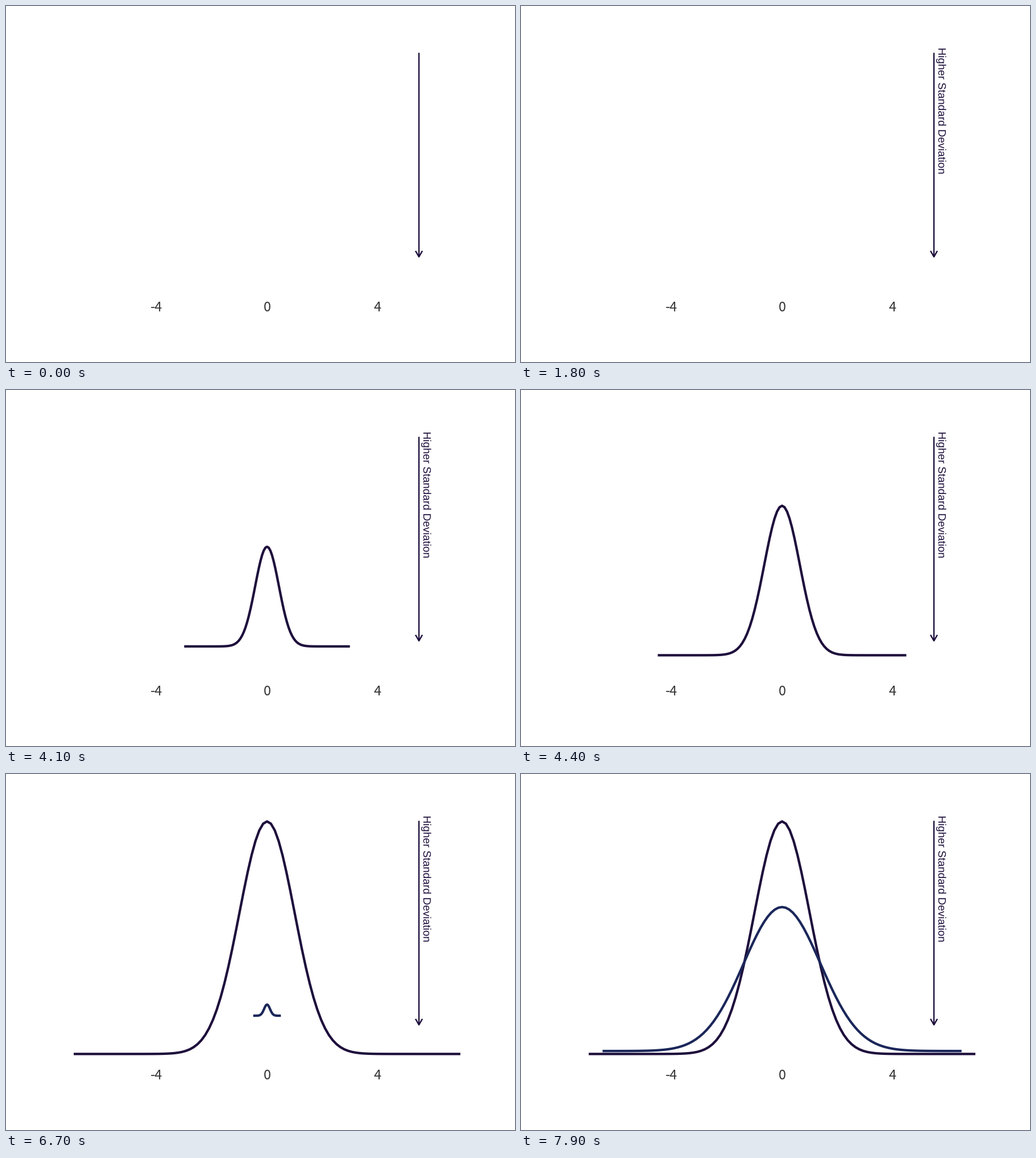
A matplotlib script that plays this animation: 895 by 626 pixels, repeating every 8000 ms.

```python
import numpy as np
import matplotlib.pyplot as plt
from matplotlib.animation import FuncAnimation
from matplotlib.patches import PathPatch
from matplotlib.path import Path
from matplotlib.textpath import TextPath

W, H, DPI = 895, 626, 100
PT = 72 / DPI                  # points per pixel
STEPS = 14                     # frames an element takes to grow in
PURPLE, BLUE, GREY = "#1e0f3c", "#1b275a", "#333333"


def px(x):
    return 459 + 48.56 * x


def py(y):
    return 492.3 - 1025 * y


# The small surplus keeps the size from rounding down a pixel
fig = plt.figure(figsize=((W + 0.01) / DPI, (H + 0.01) / DPI), dpi=DPI,
                 facecolor="white")
ax = fig.add_axes([0, 0, 1, 1])
ax.set_xlim(0, W)
ax.set_ylim(H, 0)
ax.axis("off")


def stroke(x, y, color, width):
    line, = ax.plot(x, y, color=color, lw=width * PT, snap=False,
                    solid_capstyle="butt", solid_joinstyle="round")
    return line


# Axis labels
for value in (-4, 0, 4):
    ax.text(px(value), 536.5, f"{value:d}", family="Noto Sans CJK JP",
            color=GREY, fontsize=23.5 * PT, ha="center", va="baseline")

# Arrow
shaft, tip = px(5.5), py(0.05)
stroke([shaft, shaft], [py(0.4), tip], PURPLE, 2.4)
stroke([shaft - 6, shaft, shaft + 6], [tip - 10.4, tip, tip - 10.4], PURPLE, 2.4)

# Caption, reading downwards, centred on its cap height
SIZE = 18.97
glyphs = TextPath((0, 0), "Higher Standard Deviation", size=SIZE,
                  prop={"family": "Liberation Sans"})
box = glyphs.get_extents()
u = glyphs.vertices[:, 0] - (box.x0 + box.x1) / 2
v = glyphs.vertices[:, 1] - 0.344 * SIZE
caption = ax.add_patch(PathPatch(glyphs, facecolor=PURPLE, lw=0))

# Bell curves: (line, sd, first frame)
xs = np.linspace(-7, 7, 101)
curves = [(stroke([], [], PURPLE, 4.27), 1.0, 36),
          (stroke([], [], BLUE, 4.27), 1.5, 67)]


def growth(frame, start):
    return min(max(frame - start + 1, 0), STEPS) / STEPS


def draw(frame):
    s = growth(frame, 5)
    caption.set_visible(s > 0)
    verts = np.column_stack([740.4 + v * s, py(0.3) + u * s])
    caption.set_path(Path(verts, glyphs.codes))

    for line, sd, start in curves:
        s = growth(frame, start)
        line.set_visible(s > 0)
        ys = np.exp(-0.5 * (xs / sd) ** 2) / (sd * np.sqrt(2 * np.pi))
        mid = ys.mean()
        line.set_data(px(xs * s), py(mid + (ys - mid) * s))
    return [caption] + [c[0] for c in curves]


anim = FuncAnimation(fig, draw, frames=80, interval=100, repeat=True,
                     repeat_delay=0, blit=False)
plt.show()
```
